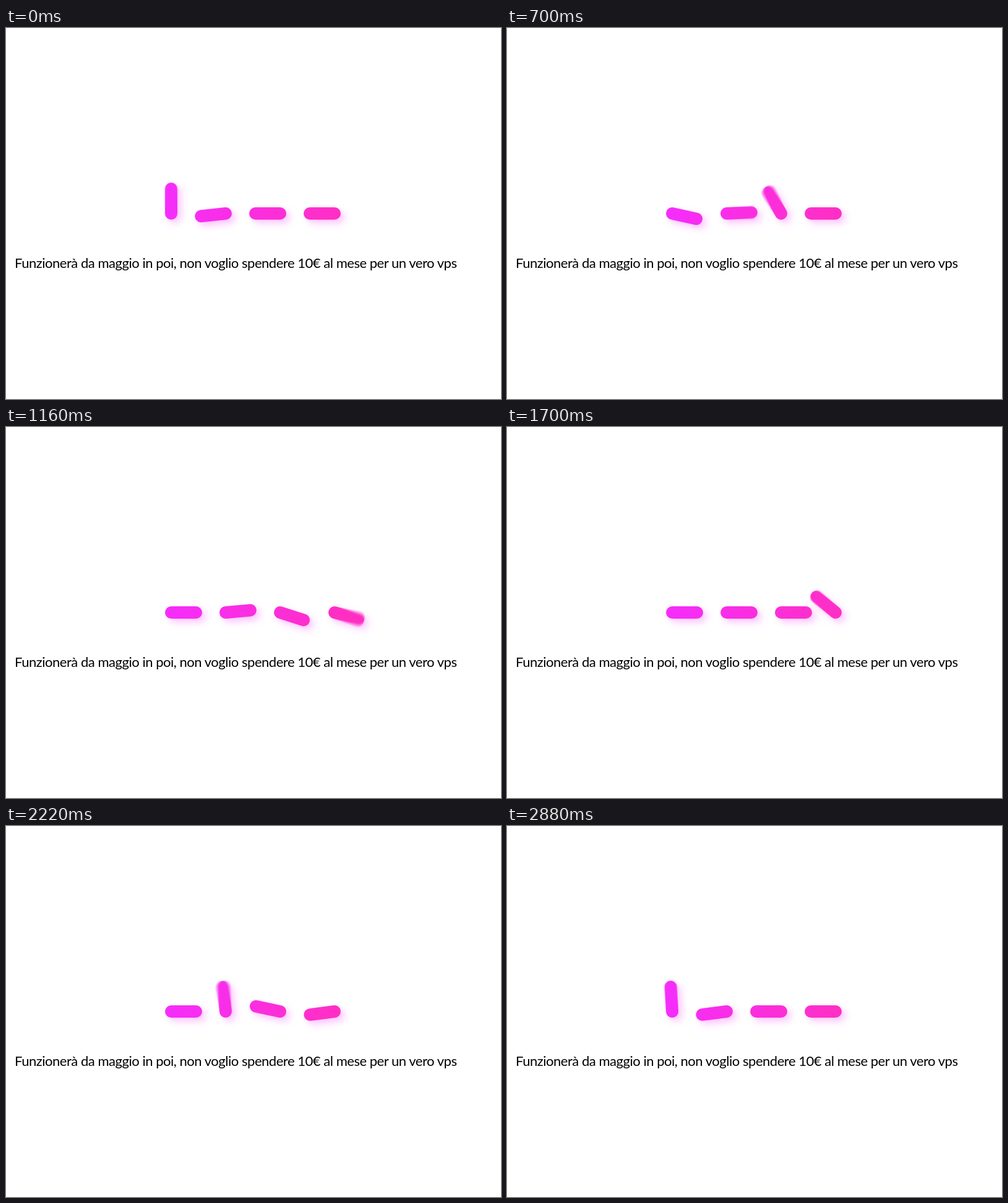
An HTML page with a canvas that plays this animation: 800 px wide and 600 px high, repeating every 2.9 s.

```html
<!DOCTYPE html>
<html lang="it">
<head>
<meta charset="utf-8">
<style>
  html, body { margin: 0; width: 100%; height: 100%; overflow: hidden; background: #fff; }
  canvas { position: absolute; left: 0; top: 0; }
  p {
    position: absolute; left: 14px; top: 366px; margin: 0; white-space: nowrap; color: #000;
    font: 22px/28px "Comic Sans MS", "Comic Neue", Lato, sans-serif; letter-spacing: -0.47px;
  }
</style>
</head>
<body>
<canvas id="stage" width="800" height="600"></canvas>
<p>Funzionerà da maggio in poi, non voglio spendere 10€ al mese per un vero vps</p>
<script>
const HALF = 1450, PERIOD = 2 * HALF, SAMPLES = 5;

const progress = (t, start, length) => Math.min(1, Math.max(0, (t - start) / length));

// Turn by some degrees; speed is the relative speed at the start (above 1 slows down).
function sweep(t, start, end, degrees, speed) {
  const u = progress(t, start, end - start);
  return degrees * u * (speed + (1 - speed) * u);
}

// Swing past the resting place and settle back.
function bounce(t, start, length) {
  const u = progress(t, start, length);
  return 120 * u * (1 - u) ** 2;
}

// Degrees clockwise from upright while the wave runs right: the first bar falls,
// knocks the second round from below, which throws the third onto the fourth.
const swings = [
  t => sweep(t, 0, 390, 90, 0.65) + bounce(t, 390, 540),
  t => -90 + sweep(t, 375, 687, -180, 1.7) - bounce(t, 687, 620) - bounce(t + HALF, 935, 700),
  t => -90 + sweep(t, 582, 935, 180, 1) + bounce(t, 935, 700),
  t => -90 + sweep(t, 935, HALF, -270, 1.7)
];

// The way back is the same motion mirrored.
function angle(bar, time) {
  const t = (time + PERIOD) % PERIOD;
  return t < HALF ? swings[bar](t) : -swings[3 - bar](t - HALF);
}

const ctx = document.getElementById("stage").getContext("2d");
const layer = document.createElement("canvas");
layer.width = 800;
layer.height = 600;
const pen = layer.getContext("2d");
pen.lineWidth = 20;
pen.lineCap = "round";
const tint = pen.createLinearGradient(257, 0, 541, 0);
tint.addColorStop(0, "#f52dfb");
tint.addColorStop(1, "#ff2fc3");
pen.fillStyle = tint;

function drawBar(x, degrees) {
  const r = degrees * Math.PI / 180;
  pen.beginPath();
  pen.moveTo(x, 300);
  pen.lineTo(x + 40 * Math.sin(r), 300 - 40 * Math.cos(r));
  pen.stroke();
}

function draw(t) {
  pen.clearRect(0, 0, 800, 600);

  // Motion blur: the mean of several moments around t.
  pen.globalCompositeOperation = "lighter";
  pen.globalAlpha = 1 / SAMPLES;
  for (let bar = 0; bar < 4; bar++)
    for (let k = 0; k < SAMPLES; k++)
      drawBar(267 + 88 * bar, angle(bar, t + 4 * (k - 2)));

  pen.globalAlpha = 1;
  pen.globalCompositeOperation = "source-in";
  pen.fillRect(0, 0, 800, 600);

  ctx.clearRect(0, 0, 800, 600);
  ctx.shadowColor = "rgba(246, 45, 250, 0.27)";
  ctx.shadowBlur = 12;
  ctx.shadowOffsetX = ctx.shadowOffsetY = 6;
  ctx.drawImage(layer, 0, 0);
}

const start = performance.now();
function tick() {
  const t = Math.max(0, performance.now() - start) % PERIOD;
  draw(Math.floor(t / 20) * 20);
  requestAnimationFrame(tick);
}
tick();
</script>
</body>
</html>
```
